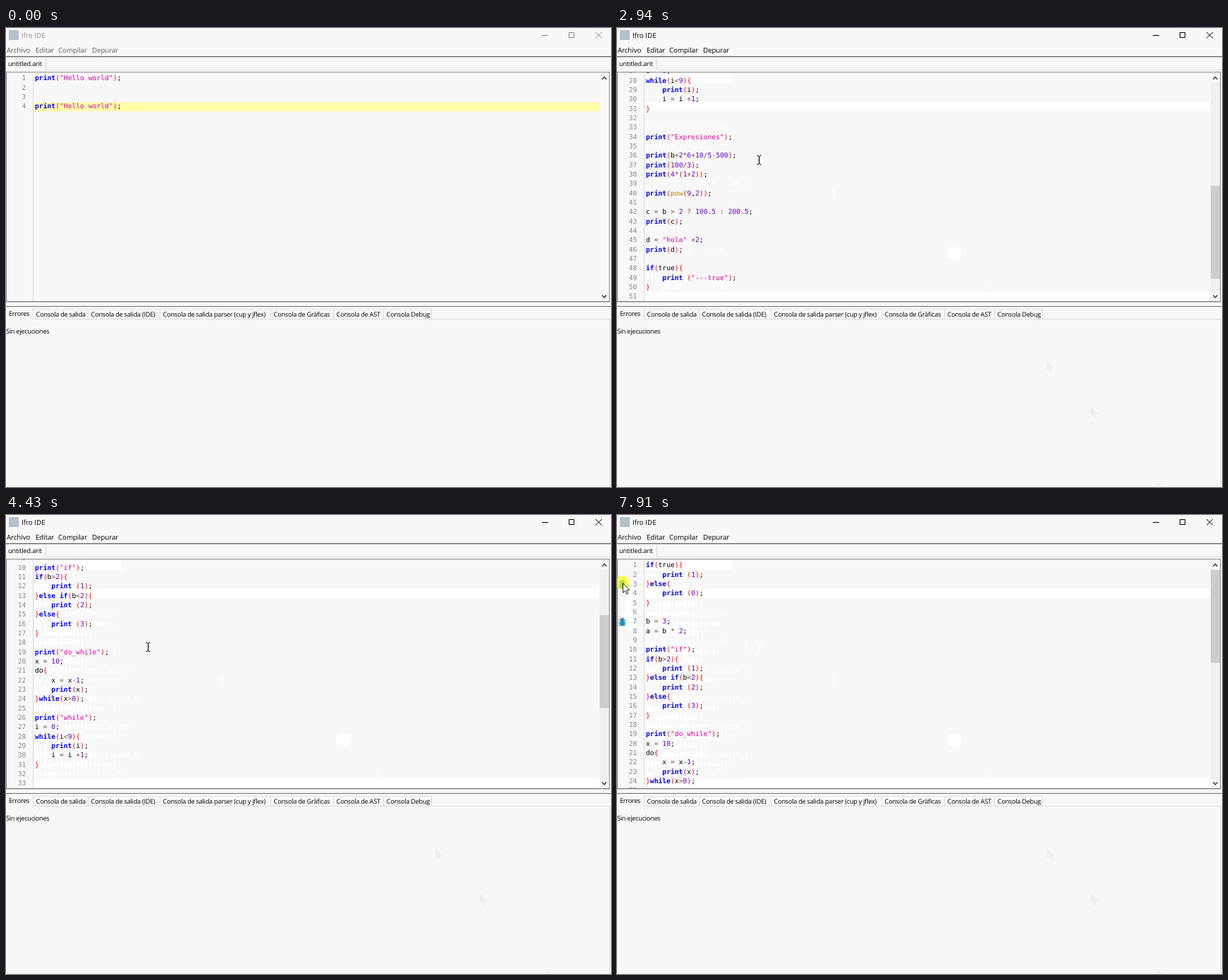
These frames come from a looping animation (858x652 px, 7.99 s). An HTML page with a canvas:

```html
<!DOCTYPE html>
<html lang="es">
<head>
<meta charset="utf-8">
<title>Ifro IDE</title>
<style>
html, body { margin: 0; width: 100%; height: 100%; overflow: hidden; background: #f8f8f8; }
canvas { display: block; }
</style>
</head>
<body>
<canvas id="stage" width="858" height="652"></canvas>
<script>
const ctx = document.getElementById('stage').getContext('2d');
const LOOP = 7990, CHAR = 5.833, ROW = 40 / 3, TOP = 65, LEFT = 41;
const BOTTOM = 396.7, NOTCH = 40;
const BG = '#f8f8f8';
const MONO = '9.69px "DejaVu Sans Mono", monospace';
const MENU = '9.8px "Open Sans", sans-serif';
const SMALL = '9.17px "Open Sans", sans-serif';

const hello = ['print("Hello world");', '', '', 'print("Hello world");'];
const code = `if(true){
    print (1);
}else{
    print (0);
}

b = 3;
a = b * 2;

print("if");
if(b>2){
    print (1);
}else if(b<2){
    print (2);
}else{
    print (3);
}

print("do_while");
x = 10;
do{
    x = x-1;
    print(x);
}while(x>0);

print("while");
i = 0;
while(i<9){
    print(i);
    i = i +1;
}


print("Expresiones");

print(b+2*6+10/5-500);
print(100/3);
print(4*(1+2));

print(pow(9,2));

c = b > 2 ? 100.5 : 200.5;
print(c);

d = "hola" +2;
print(d);

if(true){
    print ("---true");
}

if(false){
    print ("---false");
}`.split('\n');

// [time, wheel notches up from the bottom, notches shown by a lagging thumb]
const views = [
  [1850, 0, null], [1930, 0], [2860, 1, 0], [2940, 1], [3010, 2], [3180, 3],
  [3250, 4], [3960, 5], [4260, 6], [4430, 7, 6], [4510, 8], [4660, 9], [4730, 10]
];
const scrollOf = notch => Math.max(0, BOTTOM - NOTCH * notch);

// [time, x, y] of the pointer; it stays put between entries
const path = [
  [370, 766, 645], [450, 672, 538], [520, 609, 473], [600, 525, 368],
  [680, 481, 322], [750, 480, 321],
  [2320, 307, 235], [2390, 202, 187], [2460, 201, 187]
];
for (let k = 0; k <= 10; k++) {
  const e = 1 - (1 - k / 10) ** 2;
  path.push([5670 + k * 77, 182 - 170 * e, 184 - 35 * e]);
}
for (let k = 0; k < 5; k++) path.push([6910 + k * 77.5, 12, 139 - k * 10.6]);
for (let k = 0; k < 3; k++) path.push([7520 + k * 80, 11 - k * 1.5, 96.4]);

const clicks = [[980, 1230, 478, 320], [6520, 6590, 12, 149], [7910, LOOP, 8, 96]];

const KEYWORDS = ['print', 'while', 'if', 'else'];

function rect(x, y, w, h, color) {
  ctx.fillStyle = color;
  ctx.fillRect(x, y, w, h);
}

function text(str, x, y, font, color, spacing = 0) {
  ctx.font = font;
  ctx.letterSpacing = spacing + 'px';
  ctx.fillStyle = color;
  ctx.fillText(str, x, y);
}

function line(points, color, width = 1) {
  ctx.strokeStyle = color;
  ctx.lineWidth = width;
  ctx.beginPath();
  points.forEach(([x, y]) => ctx.lineTo(x, y));
  ctx.stroke();
}

function disc(x, y, r, color) {
  ctx.fillStyle = color;
  ctx.beginPath();
  ctx.arc(x, y, r, 0, 7);
  ctx.fill();
}

function tokenColor(tok) {
  if (KEYWORDS.includes(tok)) return '#0000ff';
  if (tok === 'pow') return '#ad8000';
  if (tok[0] === '"') return '#dc009c';
  if (/^\d/.test(tok)) return '#6400c8';
  if (/[(){}]/.test(tok)) return '#ff0000';
  if (/^[-+*\/<>=?:]/.test(tok)) return '#804040';
  return '#000';
}

function drawLine(str, y, flat) {
  for (const m of str.matchAll(/"[^"]*"|\d+(\.\d+)?|\w+|[^\w\s]/g)) {
    const bold = KEYWORDS.includes(m[0]) ? 'bold ' : '';
    text(m[0], LEFT + m.index * CHAR, y, bold + MONO, flat || tokenColor(m[0]));
  }
}

function drawCode(lines, scroll, flat) {
  lines.forEach((str, i) => {
    const y = Math.round(TOP + 9.4 + i * ROW - scroll);
    if (y < 58 || y > 400) return;
    drawLine(str, y, flat);
    if (!flat) {
      const num = String(i + 1);
      text(num, 28.3 - num.length * CHAR, y, MONO, '#8a8a8a');
    }
  });
}

function arrow(x, y, fill, edge) {
  const shape = [[0, 0], [0, 13.5], [3, 10.8], [5.2, 15.5], [7.3, 14.6], [5.2, 10], [9.5, 9.7]];
  ctx.beginPath();
  shape.forEach(([dx, dy]) => ctx.lineTo(x + dx + .5, y + dy + .5));
  ctx.closePath();
  ctx.fillStyle = fill;
  ctx.fill();
  ctx.strokeStyle = edge;
  ctx.lineWidth = .9;
  ctx.stroke();
}

function beam(x, y, color) {
  x = Math.round(x);
  y = Math.round(y);
  rect(x, y - 5, 1.2, 11, color);
  for (const dy of [-6, 6]) {
    rect(x - 2.5, y + dy, 2.5, 1, color);
    rect(x + 1, y + dy, 2.5, 1, color);
  }
}

function pointer([, x, y], trail) {
  const inEditor = x > 38 && y < 389;
  if (inEditor) beam(x, y, trail ? '#fff' : '#000');
  else {
    const pale = y > 389 ? '#efefef' : '#fff';
    arrow(x, y, trail ? pale : '#fff', trail ? pale : '#111');
  }
}

function bug(x, y) {
  for (const s of [-1, 1]) {
    for (const dy of [-2, 1, 4]) line([[x + s * 2, y + dy], [x + s * 5.3, y + dy + (dy < 0 ? -1.5 : 1)]], '#24505f', .9);
    line([[x + s, y - 4], [x + s * 3, y - 6.5]], '#24505f', .8);
  }
  disc(x, y - 3, 2.4, '#3a7a62');
  ctx.fillStyle = '#1b9fe0';
  ctx.beginPath();
  ctx.ellipse(x, y + 1.2, 3.8, 4.6, 0, 0, 7);
  ctx.fill();
  line([[x, y - 2], [x, y + 5.5]], '#17627f', .8);
}

function chrome(active) {
  const ink = active ? '#000' : '#8c8c8c';
  const menu = active ? '#000' : '#5c5c5c';
  rect(4, 3, 14, 14, '#b4c0ca');
  text('Ifro IDE', 22, 14, MENU, ink);
  [['Archivo', 1], ['Editar', 42], ['Compilar', 74], ['Depurar', 122]]
    .forEach(([s, x]) => text(s, x, 35, MENU, menu, -.1));
  rect(760, 10, 9, 1, ink);
  ctx.strokeStyle = ink;
  ctx.lineWidth = 1;
  ctx.strokeRect(798.5, 6.5, 7, 7);
  line([[836, 6], [845, 14.5]], ink);
  line([[845, 6], [836, 14.5]], ink);

  rect(0, 40, 858, 1, '#666');
  rect(0, 41, 858, 1, '#c8c8c8');
  rect(56, 43, 1, 16, '#d9d9d9');
  rect(57, 59, 801, 1, '#dcdcdc');
  text('untitled.arit', 3, 54, SMALL, '#000', -.15);
}

function panel() {
  ctx.strokeStyle = '#828282';
  ctx.lineWidth = 1;
  ctx.strokeRect(.5, 62.8, 855.3, 325.7);
  rect(0, 389, 857, 1, '#c4c4c4');
  rect(0, 395, 858, 1, '#707070');
  const edges = [38, 116, 218, 375, 464, 535, 603];
  edges.forEach((x, i) => rect(x, i ? 399 : 397, 1, 15, '#dcdcdc'));
  rect(38, 399, 565, 1, '#e2e2e2');
  rect(38, 413, 819, 1, '#dcdcdc');
  rect(856, 413, 1, 239, '#dcdcdc');
  text('Errores', 4, 409, SMALL, '#000', -.25);
  ['Consola de salida', 'Consola de salida (IDE)', 'Consola de salida parser (cup y jflex)',
    'Consola de Gràficas', 'Consola de AST', 'Consola Debug']
    .forEach((s, i) => text(s, edges[i] + 4.6, 410, SMALL, '#000', -.25));
  text('Sin ejecuciones', 0, 434, SMALL, '#000', -.25);
}

function scrollbar(scroll) {
  if (scroll !== null) {
    rect(842, 78, 13, 297, '#f0f0f0');
    rect(842, 78 + scroll * .41, 13, 132, '#cdcdcd');
  }
  line([[845.5, 73], [848.5, 69.5], [851.5, 73]], '#333', 1.4);
  line([[845.5, 379.5], [848.5, 383], [851.5, 379.5]], '#333', 1.4);
}

function thumbScroll(view) {
  if (!view || view[2] === null) return null;
  return scrollOf(view[2] ?? view[1]);
}

function editor(t) {
  const past = views.filter(v => v[0] <= t);
  const view = past[past.length - 1];
  ctx.save();
  ctx.beginPath();
  ctx.rect(1, 63, 854.5, 325);
  ctx.clip();

  if (t < 1150) rect(39, 105.5, 802.5, 12.8, '#ffffaa');
  else {
    rect(39, 105, 802, 13, '#fff');
    if (t < 1230) rect(839, 105, 2, 13, '#ffffaa');
    if (view) rect(41, 65, 122.5, 13, '#fff');
    else {
      for (const y of [65, 105]) rect(41, y, 122.5, 13, '#c8c8ff');
      rect(41, 78, 1, 27, '#c8c8ff');
      if (t < 1700) rect(163, 105, 2, 13, '#000');
    }
  }
  if (view) rect(39, 375, 802, 13, view[1] === 0 ? '#ffffaa' : '#fff');

  let last = null;
  for (const v of past) {
    if (v[1] !== view[1] && v[1] !== last) drawCode(code, scrollOf(v[1]), '#fff');
    last = v[1];
  }
  trails(t);

  if (view) drawCode(code, scrollOf(view[1]));
  else drawCode(hello, 0);
  if (t >= 2020 && t < 2390) rect(47, 375, 1.5, 13, '#000');

  rect(38, 64, 1, 324, '#dcdcdc');
  if (t >= 6520) bug(7.5, 152);
  if (t >= 7910) bug(7.5, 98.5);
  scrollbar(thumbScroll(view));
  ctx.restore();
}

// pale marks left behind where the pointer and clicks have been
function trails(t) {
  path.filter(p => p[0] <= t).slice(0, -1).forEach(p => pointer(p, true));
  for (const [, end, x, y] of clicks) if (t >= end) disc(x, y, 10, '#fff');
}

function draw(t) {
  ctx.textRendering = 'geometricPrecision';
  rect(0, 0, 858, 652, BG);
  trails(t);
  chrome(t >= 980);
  editor(t);
  panel();
  for (const [start, end, x, y] of clicks) {
    if (t >= start && t < end) disc(x, y, 10, 'rgba(255,255,0,.6)');
  }
  const now = path.filter(p => p[0] <= t).pop();
  if (now) pointer(now);
}

function tick() {
  draw(performance.now() % LOOP);
  requestAnimationFrame(tick);
}
tick();
</script>
</body>
</html>
```
